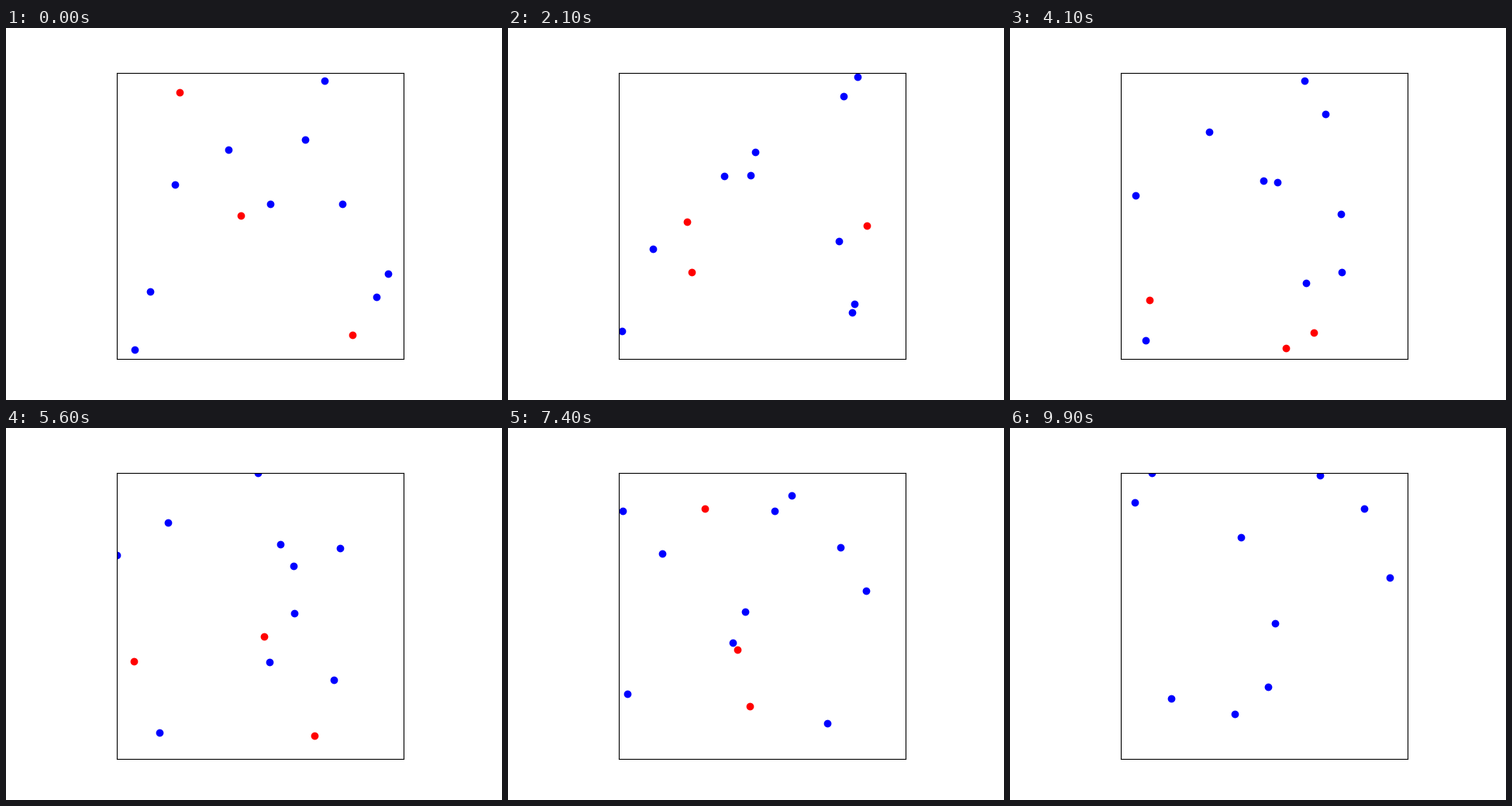
A matplotlib script for the animation above (10 s loop, 640 px wide and 480 px high).

```python
import numpy as np
import matplotlib.pyplot as plt
from matplotlib.animation import FuncAnimation

FRAMES, INTERVAL = 100, 100
LOW, HIGH = np.array([143.2, 57.6]), np.array([512.8, 427.2])  # pixels, y down
SIDE = HIGH[0] - LOW[0]
PREY_SPEED, HUNTER_SPEED = 0.01 * SIDE, 0.03 * SIDE
KEY_TIMES = (0, 21, 41, 65, 99)
HUNTERS_DIE = 78


def bounce(xy):
    """Reflect positions at the walls."""
    xy = LOW + np.abs(xy - LOW)
    return HIGH - np.abs(HIGH - xy)


def turn(v, angle):
    c, s = np.cos(angle), np.sin(angle)
    return np.array([c * v[0] - s * v[1], s * v[0] + c * v[1]])


def walk(speed, *points):
    """Constant-speed walk through key points, at most one turn per leg.

    Each leg starts in the direction the last one ended; where it has to
    turn follows from the speed. Past the last point it runs straight on.
    """
    pts = np.array(points, float)
    knots, path, way = [0], [pts[0]], None
    for p, q, t0, t1 in zip(pts, pts[1:], KEY_TIMES, KEY_TIMES[1:]):
        length, gap = speed * (t1 - t0), q - p
        dist = np.hypot(*gap)
        bend = p
        if dist < 0.8 * length:
            if way is None:
                way = turn(gap / dist, np.arccos(dist / length))
            run = (length**2 - dist**2) / (2 * (length - gap @ way))
            bend = p + run * way
            knots.append(t0 + run / speed)
            path.append(bend)
        way = (q - bend) / np.hypot(*(q - bend))
        knots.append(t1)
        path.append(q)
    knots.append(FRAMES)
    path.append(path[-1] + way * speed * (FRAMES - knots[-2]))
    f = np.arange(FRAMES)
    return bounce(np.stack([np.interp(f, knots, c) for c in zip(*path)], axis=1))


prey = np.array([walk(PREY_SPEED, *keys) for keys in (
    [(186, 340), (187, 285), (162, 216), (166, 159), (161, 96)],
    [(386, 144), (433, 88), (380, 68), (328, 78), (400, 61)],
    [(287, 157), (313, 190), (345, 199), (360, 120), (298, 141)],
    [(218, 202), (279, 191), (327, 197), (398, 167), (457, 104)],
    [(166, 415), (147, 391), (175, 403), (176, 368), (208, 349)],
    [(341, 227), (319, 160), (257, 134), (180, 115), (183, 58)],
    [(411, 68), (451, 63), (407, 111), (446, 181), (490, 193)],
    [(434, 227), (427, 275), (427, 240), (339, 238), (342, 252)],
    [(493, 317), (444, 367), (428, 315), (420, 358), (333, 334)],
    [(478, 347), (447, 356), (382, 329), (314, 286), (290, 369)],
)])

hunters = np.array([walk(HUNTER_SPEED, *keys) for keys in (
    [(447, 396), (463, 255), (392, 393), (297, 194)],
    [(303, 242), (237, 315), (180, 351), (217, 330)],
    [(224, 83), (231, 250), (356, 413), (347, 372)],
)])

fig, ax = plt.subplots(figsize=(6.4, 4.8), dpi=100)
ax.set_aspect("equal")
ax.set(xlim=(LOW[0], HIGH[0]), ylim=(HIGH[1], LOW[1]), xticks=[], yticks=[])
blue = ax.scatter(*prey[:, 0].T, s=36, color="blue")
red = ax.scatter(*hunters[:, 0].T, s=36, color="red")


def update(i):
    blue.set_offsets(prey[:, i])
    red.set_offsets(hunters[:, i])
    red.set_visible(i < HUNTERS_DIE)
    return blue, red


anim = FuncAnimation(fig, update, frames=FRAMES, interval=INTERVAL,
                     repeat=True, repeat_delay=0)
plt.show()
```
